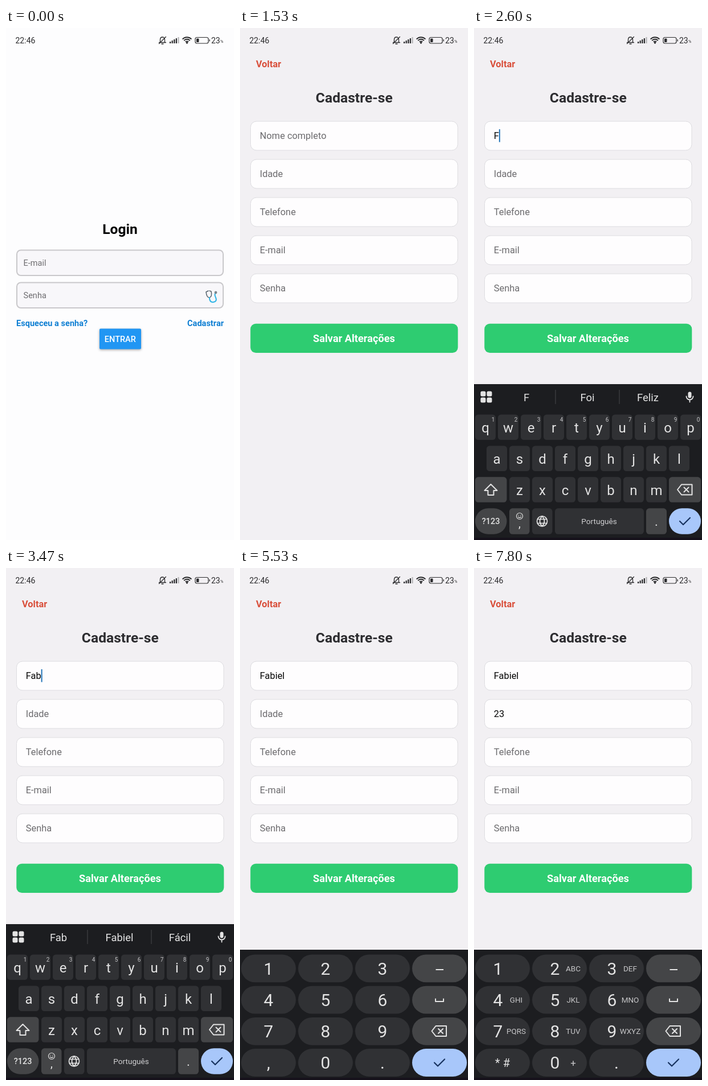
Recreate the animation shown at these times as an HTML page with a canvas. Size 400 by 900 pixels, loop 8000 ms.

```html
<!DOCTYPE html>
<html lang="pt">
<head>
<meta charset="utf-8">
<title>Cadastro</title>
<style>
  html, body { margin: 0; width: 100%; height: 100%; overflow: hidden; background: #fdfdfe; }
  canvas { display: block; }
</style>
</head>
<body>
<canvas id="stage" width="400" height="900"></canvas>
<script>
const W = 400, H = 900, LOOP = 8000;
const stage = document.getElementById('stage').getContext('2d');
const layerCanvas = Object.assign(document.createElement('canvas'), { width: W, height: H });
const layerCtx = layerCanvas.getContext('2d');
let ctx = stage;

const KEY = '#303134', SPECIAL = '#444547', PRESSED = '#5b5d60', BOARD = '#1c1d20';
const GLYPH = '#e3e3e3', ACCENT = '#a8c7fa';
const clamp = v => Math.min(1, Math.max(0, v));

// ---------- easing ----------
function bezierAt(x, [x0, y0, x1, y1, x2, y2, x3, y3]) {
  const at = (a, b, c, d, s) =>
    a * (1 - s) ** 3 + 3 * b * s * (1 - s) ** 2 + 3 * c * s * s * (1 - s) + d * s ** 3;
  let lo = 0, hi = 1;
  for (let i = 0; i < 30; i++) {
    const mid = (lo + hi) / 2;
    if (at(x0, x1, x2, x3, mid) < x) lo = mid; else hi = mid;
  }
  return at(y0, y1, y2, y3, lo);
}
const standardEase = x => bezierAt(x, [0, 0, .4, 0, .2, 1, 1, 1]);
const extraSlowEase = x => x < 1 / 6
  ? bezierAt(x, [0, 0, .05, 0, .1333, .06, .1667, .4])
  : bezierAt(x, [.1667, .4, .2083, .82, .25, 1, 1, 1]);

// ---------- drawing helpers ----------
function box(x, y, w, h, r, fill, stroke, width = 1) {
  ctx.beginPath();
  ctx.roundRect(x, y, w, h, r);
  if (fill) { ctx.fillStyle = fill; ctx.fill(); }
  if (stroke) { ctx.strokeStyle = stroke; ctx.lineWidth = width; ctx.stroke(); }
}

// y is the middle of the capital letters
function text(str, x, y, size, color, { weight = 400, align = 'left' } = {}) {
  ctx.font = `${weight} ${size}px Roboto, sans-serif`;
  ctx.textAlign = align;
  ctx.fillStyle = color;
  ctx.fillText(str, x, y + size * .355);
}
const label = (str, x, y, size, color, weight) => text(str, x, y, size, color, { weight, align: 'center' });

// Icons are drawn around their own centre
function icon(x, y, path, { stroke, fill, width = 1.8 }) {
  ctx.save();
  ctx.translate(x, y);
  ctx.lineCap = ctx.lineJoin = 'round';
  const shape = new Path2D(path);
  if (fill) { ctx.fillStyle = fill; ctx.fill(shape, 'evenodd'); }
  if (stroke) { ctx.strokeStyle = stroke; ctx.lineWidth = width; ctx.stroke(shape); }
  ctx.restore();
}

function dot(x, y, r, color) {
  ctx.beginPath();
  ctx.arc(x, y, r, 0, 7);
  ctx.fillStyle = color;
  ctx.fill();
}

function layer(alpha, dx, dy, draw) {
  layerCtx.clearRect(0, 0, W, H);
  ctx = layerCtx;
  draw();
  ctx = stage;
  ctx.globalAlpha = alpha;
  ctx.drawImage(layerCanvas, dx, dy);
  ctx.globalAlpha = 1;
}

// ---------- status bar ----------
function statusBar() {
  const ink = '#2b2b2d';
  text('22:46', 16.5, 22, 14, ink);
  icon(274.5, 21.5, 'M-6 4H6M-4 4V-1C-4-7 4-7 4-1V4M-1.5 6.5H1.5M-6 6L6-6', { stroke: ink, width: 1.3 });
  for (let i = 0; i < 5; i++) {
    const h = 3 + i * 2;
    box(287 + i * 3.6, 27 - h, 2.2, h, .5, i < 4 ? ink : '#b5b5b7');
  }
  for (let i = 0; i < 3; i++) {
    ctx.beginPath();
    ctx.arc(317.5, 27, 3.6 + i * 3.6, -Math.PI * .76, -Math.PI * .24);
    ctx.strokeStyle = ink;
    ctx.lineWidth = 2;
    ctx.stroke();
  }
  dot(317.5, 26, 1.7, ink);
  box(332, 16.5, 23, 10.5, 3, null, ink, 1.2);
  box(334, 18.5, 4.5, 6.5, 1, ink);
  box(356.5, 20, 1.3, 3.5, .5, ink);
  text('23', 360, 22, 14, ink);
  text('%', 376, 24, 7, ink);
}

// ---------- login ----------
function stethoscope(x, y) {
  icon(x, y, 'M-6-10L-10-8Q-9 2-4 2Q1 0-1-9L-4-10', { stroke: '#55616b', width: 1.5 });
  icon(x, y, 'M-4 2Q-4 10 2 10Q10 9 7 2Q4-4 7-7', { stroke: '#2fb4e6', width: 2 });
  dot(x + 7, y - 7, 2.4, '#7d878e');
}

function login(linkAlpha) {
  box(0, 0, W, H, 0, '#fdfdfe');
  label('Login', 200, 353.5, 24.6, '#000', 700);
  [['E-mail', 390.5], ['Senha', 447.5]].forEach(([name, y]) => {
    box(19, y, 362, 44.5, 7, '#f8f7fa', '#c9c8cb', 2);
    text(name, 30.5, y + 22.3, 14.55, '#6e6d70');
  });
  stethoscope(361, 472);
  const blue = '#0f7fd3';
  text('Esqueceu a senha?', 18, 519, 14.55, blue, { weight: 700 });
  ctx.globalAlpha = linkAlpha;
  text('Cadastrar', 382, 519, 14.55, blue, { weight: 700, align: 'right' });
  ctx.globalAlpha = 1;
  ctx.save();
  ctx.shadowColor = 'rgba(0,0,0,.35)';
  ctx.shadowBlur = 4;
  ctx.shadowOffsetY = 1.5;
  box(164, 528.5, 73, 36, 2, '#2196f3');
  ctx.restore();
  label('ENTRAR', 200.3, 547, 14.55, '#fff', 500);
}

// ---------- sign-up ----------
const FIELDS = ['Nome completo', 'Idade', 'Telefone', 'E-mail', 'Senha'];
const fieldY = i => 189.5 + i * 67;

function signUp(values, focus, caret) {
  box(0, 0, W, H, 0, '#f2f0f3');
  text('Voltar', 28, 63.5, 16.36, '#d94f3b', { weight: 700 });
  label('Cadastre-se', 200.3, 122.5, 24.6, '#2d2d30', 700);
  FIELDS.forEach((name, i) => {
    const y = fieldY(i), value = values[i];
    box(18.5, y - 25.5, 363.5, 51, 10.5, '#fefdfe', '#dddce0');
    text(value || name, 34.8, y, 16.36, value ? '#050505' : '#6c6b6e');
    if (caret && focus === i) {
      const end = value ? ctx.measureText(value).width : 0;
      box(34.8 + end, y - 11.5, 2, 22.5, 0, '#2375b8');
    }
  });
  box(18.3, 519.8, 364, 51.2, 9.5, '#2ecc71');
  label('Salvar Alterações', 200, 546, 18.18, '#fff', 700);
}

// ---------- keyboards ----------
const ROWS = ['qwertyuiop', 'asdfghjkl', 'zxcvbnm'];
const ROW_X = [2, 22, 62], ROW_Y = [679.5, 734.5, 789.3];

function backspace(x, y) {
  icon(x, y, 'M-13 0L-6-9H12.5V9H-6ZM-1.5-4L6.5 4M6.5-4L-1.5 4', { stroke: GLYPH, width: 2 });
}
const check = (x, y) => icon(x, y, 'M-9 0L-3 6L9-6', { stroke: '#17325f', width: 2.2 });

function toolbar(upper, words) {
  for (const x of [11.5, 22.5]) for (const y of [638.5, 649.5]) box(x, y, 9, 9, 2.5, GLYPH);
  icon(378.5, 648.5, 'M-3-6A3 3 0 0 1 3-6V-1A3 3 0 0 1-3-1Z', { fill: GLYPH });
  icon(378.5, 648.5, 'M-6-1A6 6 0 0 0 6-1M0 5V9', { stroke: GLYPH });
  if (upper) {
    icon(93, 648.5, 'M-8-8H8V3L3 8H-8ZM8 3H3V8M-3-3V-2M3-3V-2M-4 2Q0 5 4 1', { stroke: '#7d7e81', width: 1.6 });
    for (let i = 0; i < 4; i++) {
      ctx.save();
      ctx.translate(164, 648.5);
      ctx.rotate(i * Math.PI / 4);
      box(-2.3, -9.5, 4.6, 19, 1, GLYPH);
      ctx.restore();
    }
    dot(164, 648.5, 7.2, GLYPH);
    dot(164, 648.5, 3.2, BOARD);
    box(226.5, 639.5, 18, 18, 1, '#c9cacc');
    dot(306.5, 648.5, 9.6, GLYPH);
    dot(313, 655, 4, BOARD);
    [[-5.5, -1], [-2.5, -5], [2.5, -5], [5.5, -1]].forEach(([x, y]) => dot(306.5 + x, 648.5 + y, 1.5, BOARD));
    return;
  }
  for (const x of [143, 255]) box(x - .5, 636, 1, 25, 0, '#47484b');
  words.forEach((word, i) => label(word, [92, 199, 305][i], 649, 18.4, GLYPH));
}

function letterBoard(upper, words, pressed) {
  box(0, 626, W, 274, 0, BOARD);
  box(0, 896, W, 4, 0, '#16121b');
  toolbar(upper, words);
  ROWS.forEach((row, r) => [...row].forEach((char, c) => {
    const x = ROW_X[r] + c * 40, y = ROW_Y[r];
    box(x, y, 36, 44.5, 5.5, KEY);
    label(upper ? char.toUpperCase() : char, x + 18, y + 23, 24, GLYPH);
    if (r === 0) label((c + 1) % 10, x + 31.5, y + 8.5, 10, '#c6c6c8');
  }));

  box(2, 789.3, 55.5, 44.5, 5.5, SPECIAL);
  icon(29.5, 812, 'M0-10L11 1H5V9H-5V1H-11Z', { stroke: GLYPH, fill: upper ? GLYPH : null, width: 2 });
  box(342, 789.3, 56, 44.5, 5.5, SPECIAL);
  backspace(370, 811.5);

  const y = 844.3;
  box(2, y, 55.5, 45.5, 23, SPECIAL);
  label('?123', 29.7, 867, 14.5, GLYPH, 500);
  box(62, y, 35.5, 45.5, 5.5, SPECIAL);
  icon(80, 858, 'M-5.5 0A5.5 5.5 0 0 1 5.5 0A5.5 5.5 0 0 1-5.5 0M-2-1.6V-1.2M2-1.6V-1.2M-2.5 1.5Q0 4 2.5 1.5', { stroke: GLYPH, width: 1.2 });
  label(',', 80, 871, 20, GLYPH);
  box(102, y, 35.5, 45.5, 5.5, KEY);
  icon(119.5, 867, 'M-9 0A9 9 0 0 1 9 0A9 9 0 0 1-9 0M-8-3.5H8M-8 3.5H8M0-9Q-8 0 0 9Q8 0 0-9', { stroke: GLYPH, width: 1.7 });
  box(142, y, 156, 45.5, 5.5, KEY);
  label('Português', 219.5, 867, 13.6, '#cfcfd1');
  box(302, y, 36, 45.5, 5.5, SPECIAL);
  label('.', 320, 867, 22, GLYPH);
  box(342, y, 56, 45.5, 23, ACCENT);
  check(370, 867);

  if (pressed) {
    const r = ROWS.findIndex(row => row.includes(pressed.toLowerCase()));
    const x = ROW_X[r] + ROWS[r].indexOf(pressed.toLowerCase()) * 40, top = ROW_Y[r];
    box(x - 9, top - 56, 54, 100.5, 8, SPECIAL);
    label(pressed, x + 18, top - 28, 30, GLYPH);
  }
}

const PHONE_HINTS = ['', 'ABC', 'DEF', 'GHI', 'JKL', 'MNO', 'PQRS', 'TUV', 'WXYZ', '', '+', ''];

function numberBoard(phone, pressed) {
  box(0, 671, W, 229, 0, BOARD);
  box(0, 896, W, 4, 0, '#16121b');
  [...'123456789,0.'].forEach((char, i) => {
    const x = 2 + i % 3 * 100, y = 679.5 + Math.floor(i / 3) * 55.2, mid = y + 24.7;
    const hint = phone ? PHONE_HINTS[i] : '';
    box(x, y, 96, 48.8, 24.4, char === pressed ? PRESSED : KEY);
    if (phone && char === ',') label('* #', x + 48, mid, 20, GLYPH);
    else label(char, x + (phone && char !== '.' ? 40 : 48), mid, 30, GLYPH);
    if (hint) label(hint, x + 72, mid, hint === '+' ? 17 : 13.5, '#c6c6c8');
  });
  for (let r = 0; r < 4; r++) box(302, 679.5 + r * 55.2, 96, 48.8, 24.4, r < 3 ? SPECIAL : ACCENT);
  box(343.5, 705, 13.5, 2, 0, GLYPH);
  icon(350, 759.5, 'M-7-2V2.5H7V-2', { stroke: GLYPH, width: 2 });
  backspace(349.5, 814);
  check(350, 869.5);
}

// ---------- timeline ----------
const latest = (steps, t) => steps.reduce((value, [at, next]) => t >= at ? next : value, steps[0][1]);
const within = (spans, t) => spans.find(([from, to]) => t >= from && t < to);

const NAME = [[0, ''], [2530, 'F'], [2867, 'Fa'], [3430, 'Fab'], [4330, 'Fabiel ']];
const AGE = [[0, ''], [6465, '2'], [6725, '23']];
const WORDS = [
  [0, ['F', 'Foi', 'Feliz']], [2867, ['Fa', 'Faz', 'Fala']],
  [3430, ['Fab', 'Fabiel', 'Fácil']], [4330, ['de', 'é', 'e']]
];
const PRESSES = [[2465, 2570, 'F'], [2800, 2900, 'a'], [3370, 3460, 'b'], [6400, 6520, '2'], [6665, 6725, '3']];
const CARET = [
  [1800, 2270], [2530, 3330], [3430, 3930], [4330, 4930],
  [5065, 5530], [6030, 7230], [7290, 7800]
];
const SLIDE_START = 905, SLIDE_TIME = 450, KEYS_START = 1807, KEYS_TIME = 285;

function render(t) {
  const slide = extraSlowEase(clamp((t - SLIDE_START) / SLIDE_TIME));
  const fade = clamp((t - SLIDE_START - 45) / 83);
  const tapped = Math.min(clamp((t - 70) / 150), clamp((530 - t) / 250));
  const focus = t < 5065 ? 0 : t < 7270 ? 1 : 2;

  box(0, 0, W, H, 0, '#fefefe');
  if (fade < 1) layer(1, -40 * slide, 0, () => login(1 - .8 * tapped));
  if (fade > 0) {
    const values = [latest(NAME, t), latest(AGE, t)];
    layer(fade, 40 * (1 - slide), 0, () => signUp(values, focus, within(CARET, t)));
  }
  statusBar();

  const press = within(PRESSES, t)?.[2];
  if (focus > 0) numberBoard(focus === 2, press);
  else if (t > KEYS_START) {
    const rise = standardEase(clamp((t - KEYS_START) / KEYS_TIME));
    layer(rise, 0, 274 * (1 - rise), () => letterBoard(t < 2530, latest(WORDS, t), press));
  }
}

const start = performance.now();
function tick() {
  render((performance.now() - start) % LOOP);
  requestAnimationFrame(tick);
}
tick();
</script>
</body>
</html>
```
